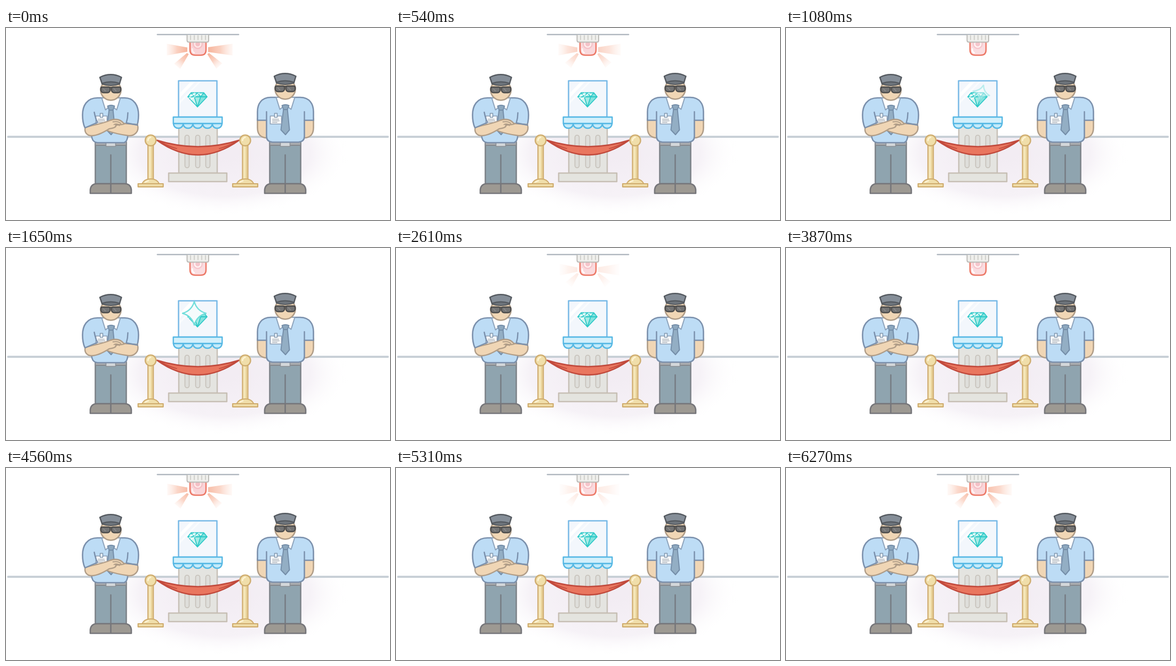
An HTML page with a canvas that plays this animation: 720x360 px, repeating every 6300 ms.

```html
<!DOCTYPE html>
<html>
<head>
<meta charset="utf-8">
<style>
html, body { margin: 0; width: 100%; height: 100%; overflow: hidden; background: #fff; }
canvas { display: block; width: 720px; height: 360px; }
</style>
</head>
<body>
<canvas id="stage" width="720" height="360"></canvas>
<script>
const LOOP = 6300, BLINK = 450;
const ctx = document.getElementById('stage').getContext('2d');
const clamp = v => Math.max(0, Math.min(1, v));
const smooth = v => { v = clamp(v); return v * v * (3 - 2 * v); };
const SKIN = '#f0d6b5', SKIN_LINE = '#b09d88', SHIRT = '#bddcf5', SHIRT_LINE = '#7b90ac';

function paint(c, fill, line, width = 2.6) {
  if (fill) { c.fillStyle = fill; c.fill(); }
  if (line) { c.strokeStyle = line; c.lineWidth = width; c.stroke(); }
}
function path(c, d, fill, line, width = 2.6) {
  const p = new Path2D(d);
  if (fill) { c.fillStyle = fill; c.fill(p); }
  if (line) { c.strokeStyle = line; c.lineWidth = width; c.stroke(p); }
}
function box(c, x, y, w, h, r, fill, line, width) {
  c.beginPath();
  c.roundRect(x, y, w, h, r);
  paint(c, fill, line, width);
}
function disc(c, x, y, r, fill, line, width) {
  c.beginPath();
  c.arc(x, y, r, 0, Math.PI * 2);
  paint(c, fill, line, width);
}

function room(c) {
  c.fillStyle = '#fff';
  c.fillRect(0, 0, 720, 360);
  c.save();
  c.beginPath();
  c.rect(0, 205, 720, 155);
  c.clip();
  c.translate(410, 235);
  c.scale(1, 0.5);
  const g = c.createRadialGradient(0, 0, 20, 0, 0, 235);
  g.addColorStop(0, '#f2ecf3');
  g.addColorStop(0.65, '#f6f2f7');
  g.addColorStop(1, 'rgba(255,255,255,0)');
  c.fillStyle = g;
  c.fillRect(-240, -240, 480, 480);
  c.restore();
  path(c, 'M4 204H716', null, '#c8d0d7', 3.8);
  path(c, 'M284 12.2H436', null, '#b2b9c1', 2.6);
}

function lamp(c) {
  path(c, 'M345 26V41Q345 51 355 51H365Q375 51 375 41V26Z', '#fadde0', '#ec7765', 2.5);
  c.save();
  c.beginPath();
  c.rect(347, 26, 26, 23);
  c.clip();
  disc(c, 359.5, 30, 9.5, '#f6c6cc');
  disc(c, 359.5, 30, 5.8, '#f6c6cc', '#fff4f4', 2.6);
  c.restore();
  path(c, 'M349.5 39V42Q350 46 353 46.5', null, '#fff', 2.4);
  path(c, 'M339.5 13V23Q339.5 26.5 343 26.5H376.5Q380 26.5 380 23V13', '#efefec', '#bcbcb8', 2);
  for (let x = 346; x < 377; x += 7) path(c, `M${x} 14V22`, null, '#c8c8c4', 1.6);
}

function showcase(c) {
  box(c, 324, 180, 72, 92, 0, '#e4e4e0', '#c7c0b7', 2.5);
  for (const x of [335.5, 355.5, 374.5]) box(c, x, 201, 8, 61, 4, '#dededa', '#c5c0b9', 1.6);
  box(c, 305, 272, 109, 16, 0, '#e4e4df', '#c7bfb5', 2.5);
  box(c, 323.5, 99, 72, 68, 0, '#f3f7fc', '#78b9e6', 2.5);
  path(c, 'M326 122L346 101H354L326 131Z', '#fff');
  path(c, 'M326 137L361 101H365L326 142Z', '#fafcfe');
  let d = 'M314 179';
  for (let i = 0; i < 5; i++) d += 'c0 12 18.2 12 18.2 0';
  path(c, d + 'Z', '#c4ebfa', '#55b8e4', 2.4);
  box(c, 313.7, 167, 91.6, 12, 0, '#d3f0fb', '#55b8e4', 2.4);
}

function gem(c) {
  path(c, 'M347 121.5H371L377 129L359 148L341 129Z', '#d3f6f2');
  path(c, 'M359 121.5L365 129H353ZM353 129H365L359 148Z', '#a4ebe4');
  path(c, 'M365 129H377L359 148ZM371 121.5L377 129H365Z', '#84e3dd');
  path(c, 'M347 121.5H371L377 129L359 148L341 129ZM341 129H377M347 121.5L353 129L359 121.5L365 129L371 121.5M353 129L359 148L365 129',
    null, '#2cc8c8', 1.8);
  path(c, 'M343 131L354 122M347 134L362 122', null, 'rgba(255,255,255,.65)', 2);
}

function post(c, x) {
  c.save();
  c.translate(x, 0);
  box(c, -5, 219, 10, 66, 0, '#f5e6b9', '#cfac6e', 2.2);
  path(c, 'M2.3 222V283', null, '#e7cf95', 2.6);
  path(c, 'M-16 292C-13 285-6 283 0 283S13 285 16 292Z', '#f0deaa', '#cfac6e', 2.2);
  path(c, 'M-10 289Q-7 287-4 286.5', null, '#fff8df', 2);
  box(c, -23.5, 292, 47, 5.8, 0, '#f0deaa', '#cfac6e', 2.2);
  disc(c, 0, 210.8, 10.1, '#f0deaa', '#cfac6e', 2.3);
  path(c, 'M-5 211Q-5 206 0 205', null, '#fff5d6', 2.6);
  c.restore();
}

function rope(c) {
  path(c, 'M283 210.5Q360 234.5 437 210.5Q360 265.5 283 210.5Z', '#e9765f', '#c14a3d', 2.5);
  path(c, 'M290 213.5Q304 222 320 226M430 213.5Q416 222 400 226', null, '#c14a3d', 1.8);
}

function legs(c) {
  box(c, -29, 214, 58, 78, 0, '#8fa4af', '#7d8389');
  box(c, -29, 212, 58, 8, 0, '#a9abae', '#85898e', 1.8);
  box(c, -9, 214.5, 18, 7.5, 0, '#d3d7da', '#8c9197', 1.6);
  path(c, 'M0 238V292', null, '#777d84');
  path(c, 'M-38.5 310V303Q-37 292-26 292H0V310ZM38.5 310V303Q37 292 26 292H0V310Z', '#9d9992', '#76767a');
}

function collar(c, tieEnd) {
  path(c, `M-3 152L-8 ${tieEnd - 9}L0.5 ${tieEnd}L8 ${tieEnd - 9}L4 152Z`, '#93aec4', '#758ea9', 2);
  path(c, 'M-17 131L-10 153.5L0.5 145L11 153.5L18 131Z', '#fff', '#8ea3bb', 2);
  path(c, 'M-6 146.5Q0.5 143 7 146.5L4 154H-3Z', '#8da8bf', '#758ea9', 2);
}

function badge(c, x, y) {
  box(c, x, y, 21, 15, 0, '#fff', '#8c9fb5', 1.7);
  path(c, `M${x + 4} ${y + 6}h12M${x + 4} ${y + 9}h13M${x + 4} ${y + 12}h9`, null, '#7d8794', 1.2);
  box(c, x + 8, y - 5, 5, 7.5, 0, '#eef5fb', '#8197ae', 1.5);
}

function head(c) {
  disc(c, 0, 116.5, 19, SKIN, SKIN_LINE);
  path(c, 'M-18 111.5H18', null, '#4c4c4c', 2.4);
  for (const s of [-1, 1]) {
    box(c, s * 10 - 8.8, 110.8, 17.6, 10.4, [3, 3, 5.2, 5.2], '#737373', '#4c4c4c', 2.4);
    path(c, `M${s * 10 - 4} 114L${s * 10} 118`, null, '#8c8c8c', 1.6);
  }
  path(c, 'M-16.5 102Q0 97 16.5 102V105Q0 111-16.5 105Z', '#6e757c', '#555a60', 2.2);
  path(c, 'M-20.5 92.5Q0 82 20 92.5L16.5 104Q0 98-16.5 104Z', '#858e98', '#555a60', 2.5);
}

function foldedGuard(c) {
  legs(c);
  path(c, 'M-16 131H-25C-45 131-53 146-53 163C-53 180-49 193-37 199L-35 207Q-33 214-25 215H25Q31 213 32 201C46 197 52 182 52 163C52 146 44 131 26 131Z',
    SHIRT, SHIRT_LINE);
  collar(c, 200);
  badge(c, -28, 165);
  path(c, 'M50 181C54 194 45 202 34 202C19 200 5 197-8 192C0 184 12 181 25 179Z', SKIN, SKIN_LINE, 2.4);
  path(c, 'M-48 187C-36 182-16 180-1 173C10 169 20 172 25 180C17 183 14 180 9 181C12 187 2 188-3 189C-14 196-25 202-36 202C-45 202-50 195-48 187Z',
    SKIN, SKIN_LINE, 2.4);
  path(c, 'M4 176Q13 174 19 179M6 181Q12 178 16 183', null, SKIN_LINE, 1.9);
  path(c, 'M-31 158Q-29 169-25 177L-48 187M32 159Q32 169 29 178L50 182', null, SHIRT_LINE, 2.4);
  head(c);
}

function standingGuard(c) {
  legs(c);
  path(c, 'M-52 170V187C-52 200-45 206-34 206V170ZM53 170V187C53 200 46 206 35 206V170Z', SKIN, SKIN_LINE);
  path(c, 'M-16 130H-27C-45 130-52 143-52 157V173H-35V203Q-35 213-24 214H25Q36 213 36 203V173H53V157C53 143 46 130 28 130Z',
    SHIRT, SHIRT_LINE);
  path(c, 'M-35 173V157M36 173V157', null, SHIRT_LINE, 2.4);
  c.translate(0, -1);
  collar(c, 201);
  badge(c, -28, 166);
  c.translate(0, -1);
  head(c);
}

function beam(x, y, angle, len, near, far, power) {
  ctx.save();
  ctx.translate(x, y);
  ctx.rotate(angle * Math.PI / 180);
  const reach = len * (0.85 + 0.2 * power);
  const g = ctx.createLinearGradient(0, 0, reach, 0);
  g.addColorStop(0, '#f6b096');
  g.addColorStop(0.5, 'rgba(248,190,168,.75)');
  g.addColorStop(1, 'rgba(253,228,218,.3)');
  ctx.globalAlpha = power;
  ctx.fillStyle = g;
  ctx.beginPath();
  ctx.moveTo(0, -near);
  ctx.lineTo(reach, -far);
  ctx.lineTo(reach, far);
  ctx.lineTo(0, near);
  ctx.fill();
  ctx.restore();
}

function alarm(t) {
  const p = (t / BLINK + 0.32) % 1;
  const power = p < 0.37 ? smooth(p / 0.37) : smooth((0.7 - p) / 0.33);
  if (power <= 0) return;
  beam(340, 40.5, 180, 37, 4, 11, power);
  beam(379, 40.5, 0, 44, 4.5, 11, power);
  beam(341, 48, 130, 30, 2, 7.5, power);
  beam(379, 48, 48, 30, 2, 7.5, power);
  ctx.globalAlpha = 0.08 * power;
  box(ctx, 346.5, 28, 27, 21.5, [0, 0, 8, 8], '#ee6f70');
  ctx.globalAlpha = 1;
}

function sparkle(t) {
  const alpha = smooth((t - 930) / 320) * smooth((1990 - t) / 300);
  if (alpha <= 0) return;
  const k = smooth((t - 930) / 700);
  const r = 15 + 7 * k, q = r * 0.22;
  ctx.save();
  ctx.globalAlpha = alpha;
  ctx.translate(368 - 15 * k, 122.5);
  ctx.rotate(0.3 * (1 - k));
  ctx.beginPath();
  ctx.moveTo(0, -r);
  ctx.quadraticCurveTo(q, -q, r, 0);
  ctx.quadraticCurveTo(q, q, 0, r);
  ctx.quadraticCurveTo(-q, q, -r, 0);
  ctx.quadraticCurveTo(-q, -q, 0, -r);
  ctx.closePath();
  paint(ctx, '#f5fbfc', '#72dedb', 2.4);
  ctx.restore();
}

const scene = document.createElement('canvas');
scene.width = 720;
scene.height = 360;
const still = scene.getContext('2d');
still.lineJoin = ctx.lineJoin = 'round';
still.lineCap = ctx.lineCap = 'round';

function buildScene(c) {
  room(c);
  lamp(c);
  showcase(c);
  gem(c);
  rope(c);
  post(c, 271.2);
  post(c, 448.5);
  c.save();
  c.translate(196.5, 0);
  foldedGuard(c);
  c.translate(327, 0);
  standingGuard(c);
  c.restore();
}

function draw(t) {
  ctx.drawImage(scene, 0, 0);
  alarm(t);
  sparkle(t);
}

buildScene(still);
draw(0);
const start = performance.now();
function tick() {
  draw((performance.now() - start) % LOOP);
  requestAnimationFrame(tick);
}
requestAnimationFrame(tick);
</script>
</body>
</html>
```
